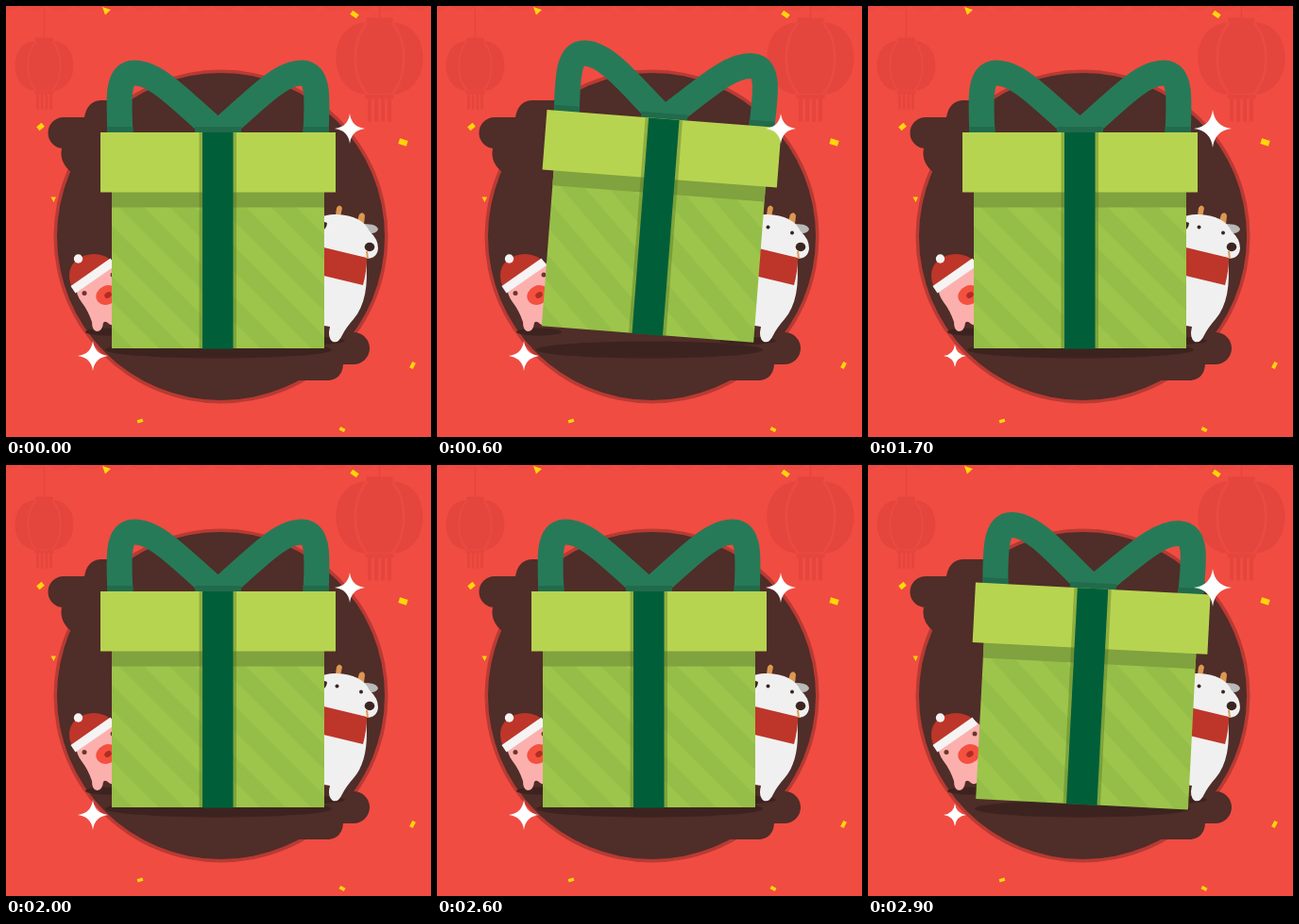
An HTML page that plays this animation: 450x457 px, repeating every 3 s.

```html
<!DOCTYPE html>
<html lang="en">
<head>
<meta charset="utf-8">
<title>Gift box</title>
<style>
  html, body { margin: 0; width: 100%; height: 100%; overflow: hidden; background: #f04c42; }
  svg { display: block; width: 450px; height: 457px; }
</style>
</head>
<body>
<svg viewBox="0 0 450 457">
  <defs>
    <pattern id="stripes" width="38" height="38" patternUnits="userSpaceOnUse" patternTransform="translate(146 213) rotate(-45)">
      <rect width="38" height="38" fill="#95be48"/>
      <rect width="19" height="38" fill="#9dc54b"/>
    </pattern>
    <g id="loop" fill="none" stroke="#277a58" stroke-width="27">
      <path d="M121 136C119 96 118 71 136 71C160 71 186 101 225 134.500"/>
    </g>
    <path id="star" d="M0-1Q.11-.11 1 0Q.11.11 0 1Q-.11.11-1 0Q-.11-.11 0-1Z" fill="#fff"/>
    <g id="lantern">
      <path d="M0-90V-40" stroke="#e4453c" stroke-width="1.6"/>
      <path d="M-14-43H14V-38C36-37 46-20 46 0S34 37 15 38V43H-15V38C-34 37-46 20-46 0S-36-37-14-38Z" fill="#e4453c"/>
      <path d="M-13-38C-30-18-30 18-13 38M13-38C30-18 30 18 13 38" fill="none" stroke="#eb4a41" stroke-width="3"/>
      <path d="M-15 38H15" stroke="#eb4a41" stroke-width="1.5"/>
      <path d="M-10.500 43V67M-3.500 43V67M3.500 43V67M10.500 43V67" stroke="#e4453c" stroke-width="4"/>
    </g>
  </defs>

  <rect width="450" height="457" fill="#f04c42"/>
  <g id="fringe" fill="#ec4940"></g>
  <use href="#lantern" transform="translate(40.500 63.500) scale(.67 .69)"/>
  <use href="#lantern" transform="translate(395.500 55.500)"/>
  <g id="confetti" fill="#ffd60a">
    <path d="M102 1L111 4L105 9.500ZM47.500 202.500H53L50.500 208Z"/>
  </g>

  <circle cx="227.500" cy="244.500" r="177" fill="#b83a33"/>
  <g fill="#4f2d28">
    <circle cx="227.500" cy="244.500" r="173.500"/>
    <path d="M160 100H100Q86 101 83 118H61A16.500 16.500 0 0 0 61 151H59Q56 166 70 177H160Z"/>
    <path d="M290 346H368A17 17 0 0 1 368 380H357Q356 395 342 397H290Z"/>
  </g>
  <g fill="#3d231f">
    <ellipse id="shade" cy="364.500" ry="9"/>
    <ellipse cx="329" cy="355" rx="30" ry="4"/>
    <ellipse cx="108" cy="345.500" rx="24" ry="4"/>
  </g>

  <g id="cow">
    <path d="M349 222L350 214Q353 209 356 214L354 224ZM372 228L374 221Q378 217 380 222L379 232Z" fill="#dc9851"/>
    <path d="M379 231Q393 231 394 237Q391 243 381 240Z" fill="#b9b9b9"/>
    <path d="M322 235Q330 220 350 221Q377 222 385 239Q394 247 394 257Q393 268 381 268C384 296 380 318 368 332Q360 341 356 349Q352 358 346 356Q340 352 343 340L295 332Q293 341 288 341Q283 338 287 326Q305 285 322 260Z" fill="#f0f0f0"/>
    <path d="M322 231Q333 226 340 230Q340 237 332 239Z" fill="#3a2521"/>
    <path d="M326 253.500L382 267Q382 281 378 296L324 283Z" fill="#bd3629"/>
    <path d="M382 260L383 268" stroke="#dc9851" stroke-width="2"/>
    <ellipse cx="385" cy="255.500" rx="5.300" ry="4.700" fill="#3a2521"/>
    <g id="cowEyes" fill="#3a2521"><circle cx="350.500" cy="234.500" r="2"/><circle cx="376" cy="240.500" r="2"/></g>
  </g>

  <g id="pig">
    <path d="M74 296L112 270Q132 285 128 312Q128 332 118 332Q115 341 109 337Q105 333 103 336Q102 345 96 345Q91 344 91 335Q87 323 80 314Q74 306 74 296Z" fill="#fcb0ae"/>
    <path d="M70 299Q62 280 75 269Q91 258 108 267L113 273Z" fill="#bd3629"/>
    <path d="M68.500 297L110.500 267.500L116 275L73.500 304.500Z" fill="#f5f3f3"/>
    <circle cx="76.500" cy="268" r="4.700" fill="#f5f3f3"/>
    <ellipse cx="107" cy="306.500" rx="12" ry="10" fill="#f4503f" transform="rotate(-25 107 306.500)"/>
    <ellipse cx="108" cy="306.500" rx="4" ry="3" fill="#b02c25" transform="rotate(-35 108 306.500)"/>
    <g id="pigEyes" fill="#6b352e"><circle cx="83" cy="304.500" r="2.500"/><circle cx="113" cy="285" r="2.500"/></g>
  </g>

  <g id="box">
    <use href="#loop"/>
    <use href="#loop" transform="matrix(-1 0 0 1 449 0)"/>
    <path d="M107.500 128H134.500V134H107.500ZM314.500 128H341.500V134H314.500ZM200 128H249V134H200Z" fill="#216b4c"/>
    <rect x="112" y="190" width="225" height="173" fill="url(#stripes)"/>
    <rect x="112" y="197" width="225" height="16.500" fill="#80a23f"/>
    <rect x="100" y="134" width="249" height="63.500" fill="#b7d451"/>
    <path d="M204.500 134H244V363H204.500Z" fill="#45691f" opacity=".35"/>
    <rect x="208" y="134" width="32.500" height="229.500" fill="#005f39"/>
  </g>

  <use id="starL" href="#star"/>
  <use id="starR" href="#star"/>
</svg>

<script>
const $ = id => document.getElementById(id);
const NS = 'http://www.w3.org/2000/svg';
const add = (parent, tag, attrs) => {
  const el = document.createElementNS(NS, tag);
  for (const k in attrs) el.setAttribute(k, attrs[k]);
  $(parent).append(el);
};

for (let x = 0; x < 460; x += 29) add('fringe', 'ellipse', { cx: x, cy: -4, rx: 14, ry: 9 });

// x, y, width, height, angle
[[369, 9, 8, 5, 35], [420.5, 144.5, 9, 6, 17], [36.5, 128, 7, 5, -40],
 [430.5, 381, 4, 7, 27], [142, 440, 6, 3.5, -17], [356, 449, 6, 3.5, 28]
].forEach(([x, y, width, height, a]) => add('confetti', 'rect', {
  x: -width / 2, y: -height / 2, width, height, transform: `translate(${x} ${y}) rotate(${a})`
}));

// Box poses: shift x, shift y, tilt, shadow centre, shadow radius
const REST = [0, 0, 0, 225, 120];
const KICK = [-1.5, -15, 4.4, 225, 120];
const APEX = [5, -22.5, -2.7, 227, 104];
const LAND = [2, -3.3, 2.95, 227, 114];
const SETTLE = [1, -3, -1.5, 225, 120];

// Each hop: first step and the poses it runs through, at rest otherwise
const HOPS = [
  [6, [KICK, SETTLE]],
  [23, [KICK, APEX, LAND]],
  [27, [KICK, APEX, LAND]]
];
const STEP = 100, STEPS = 30;

function pose(n) {
  for (const [first, poses] of HOPS) if (poses[n - first]) return poses[n - first];
  return REST;
}

const star = (id, x, y, r) => $(id).setAttribute('transform', `translate(${x} ${y}) scale(${r})`);
const show = (id, on) => { $(id).style.display = on ? '' : 'none'; };

function draw(n) {
  const [x, y, tilt, cx, rx] = pose(n);
  $('box').setAttribute('transform', `translate(${x} ${y}) rotate(${tilt} 224.5 363)`);
  $('shade').setAttribute('cx', cx);
  $('shade').setAttribute('rx', rx);
  const odd = n % 2;
  star('starL', 92, 371, odd ? 12 : 16);
  star('starR', odd ? 365 : 364, 130, odd ? 20 : 16);
  show('cowEyes', n !== 0);
  show('pigEyes', n !== 17);
}

const start = performance.now();
function tick(now) {
  draw(Math.floor(Math.max(0, now - start) / STEP) % STEPS);
  requestAnimationFrame(tick);
}
draw(0);
requestAnimationFrame(tick);
</script>
</body>
</html>
```
